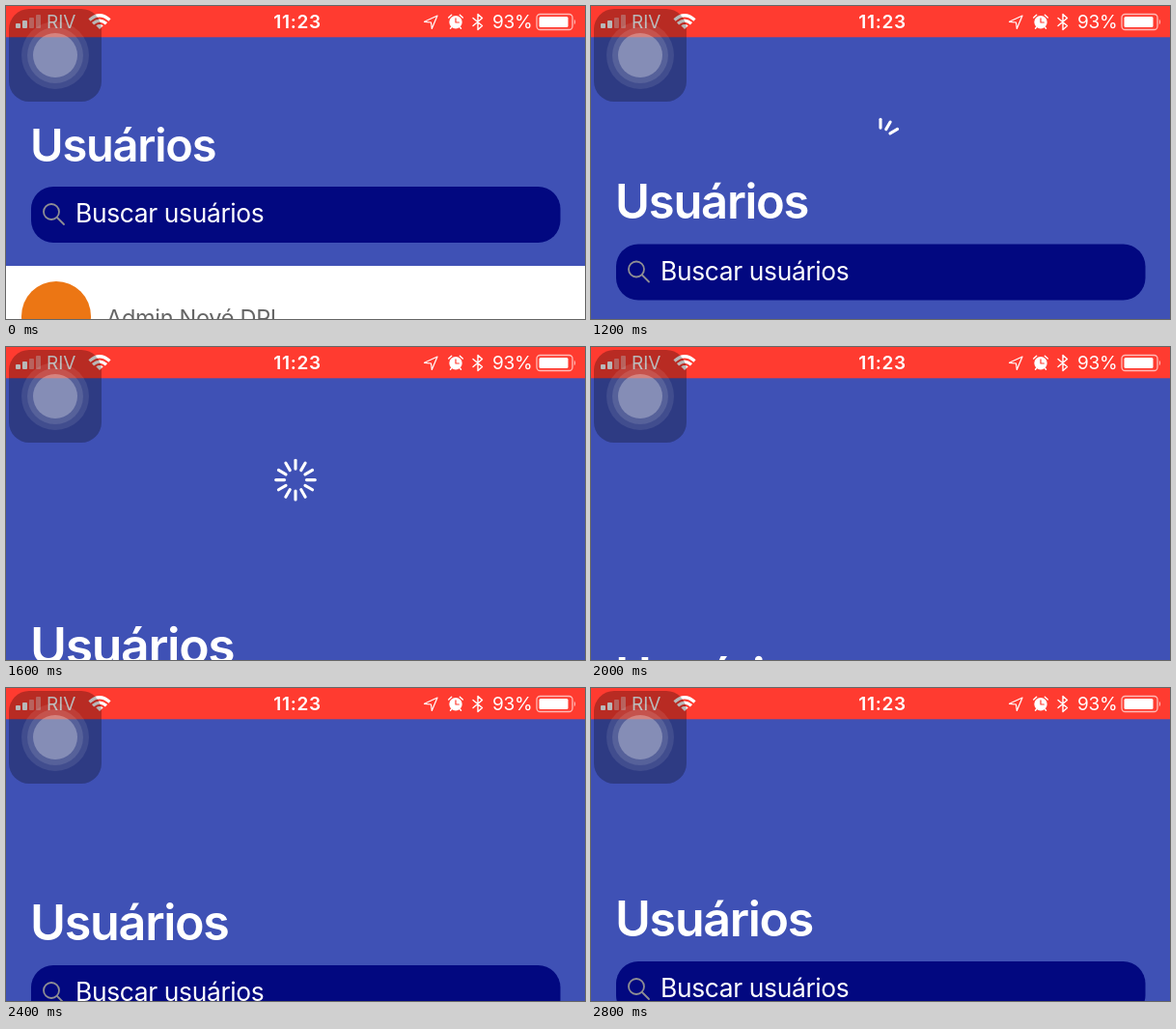
Animation, 600 px wide and 324 px high, one loop 8000 ms. Source, as an HTML page:

```html
<!DOCTYPE html>
<html lang="pt">
<head>
<meta charset="utf-8">
<style>
  html, body { margin: 0; width: 100%; height: 100%; overflow: hidden; }
  svg { display: block; width: 100vw; height: 100vh; }
  text { font-family: Inter, "Liberation Sans", sans-serif; fill: #fff; }
  .status { font-size: 19px; }
  .line { fill: none; stroke: #fff; stroke-linecap: round; stroke-linejoin: round; }
</style>
</head>
<body>
<svg viewBox="0 0 600 324">
  <rect width="600" height="324" fill="#3f51b5"/>

  <g id="page">
    <rect y="269" width="600" height="200" fill="#fff"/>
    <rect x="26" y="187" width="548.5" height="58" rx="23" fill="#020880"/>
    <g fill="none" stroke="#8e8e93" stroke-width="1.8" stroke-linecap="round">
      <circle cx="47" cy="213" r="8"/>
      <path d="M53 219L60 226"/>
    </g>
    <text x="72" y="224" font-size="26.4" letter-spacing="-.35">Buscar usuários</text>
    <circle cx="52" cy="321" r="36" fill="#ec7614"/>
    <text x="104" y="331" font-size="23.5" letter-spacing="-.3" style="fill:#666">Admin Nové DPL</text>
  </g>

  <text id="title" font-size="47" font-weight="600" letter-spacing="-1.2">Usuários</text>
  <g id="spinner" class="line" stroke-width="3.1"></g>

  <rect width="600" height="32.3" fill="#ff3b30"/>
  <g fill="#fff">
    <rect x="10" y="18" width="5" height="5" rx="1"/>
    <rect x="17" y="15" width="5" height="8" rx="1"/>
    <rect x="24" y="12" width="5" height="11" rx="1" opacity=".4"/>
    <rect x="31" y="9" width="5" height="14" rx="1" opacity=".4"/>
  </g>
  <text class="status" x="42" y="23">RIV</text>
  <g class="line" stroke-width="3.2" style="stroke-linecap:butt">
    <path d="M86.5 14.5Q97 5 107.5 14.5"/>
    <path d="M90 18.3Q97 12 104 18.3"/>
  </g>
  <path d="M97 24L93.3 20.3Q97 17.5 100.7 20.3Z" fill="#fff"/>
  <text class="status" x="302" y="23" font-weight="600" letter-spacing=".7" text-anchor="middle">11:23</text>
  <path class="line" stroke-width="1.2" d="M447 10L433.5 16.3L440.5 17L441.3 23.5Z"/>
  <circle cx="466" cy="16.7" r="6.7" fill="#fff"/>
  <path class="line" stroke-width="1.4" d="M458.7 12L461.7 9.3M473.3 12L470.3 9.3M461.5 22L460.5 23.2M470.5 22L471.5 23.2"/>
  <path class="line" stroke-width="1.2" style="stroke:#ff3b30" d="M466 12.8V17H469.3"/>
  <path class="line" stroke-width="1.4" d="M484 12.5L493.5 20.5L489 24.5V8.5L493.5 12.5L484 20.5"/>
  <text class="status" x="504" y="23" letter-spacing="-.2">93%</text>
  <rect x="550" y="8.5" width="37" height="16" rx="3.5" fill="none" stroke="#fff" stroke-opacity=".65" stroke-width="1.3"/>
  <rect x="552.5" y="11" width="30" height="11" rx="1.5" fill="#fff"/>
  <path d="M588.8 13.5Q591.5 16.5 588.8 19.5Z" fill="#fff" opacity=".65"/>

  <rect x="3" y="3" width="96" height="96" rx="21" fill="#000" opacity=".28"/>
  <g fill="#fff">
    <circle cx="51" cy="51" r="35" opacity=".09"/>
    <circle cx="51" cy="51" r="29" opacity=".11"/>
    <circle cx="51" cy="51" r="23" opacity=".28"/>
  </g>
</svg>
<script>
  const LOOP = 8000, STEP = 200, PULL_START = 1200;
  const SPOKES = 12;
  // Pull distance for each step: drag, overshoot, release, settle.
  const pulls = [59.5, 130, 167, 189, 198, 115, 100, 97.5, 96];
  const byId = id => document.getElementById(id);
  const page = byId("page"), title = byId("title"), spinner = byId("spinner");

  const spokes = Array.from({ length: SPOKES }, (_, i) => {
    const spoke = document.createElementNS("http://www.w3.org/2000/svg", "path");
    spoke.setAttribute("d", "M0 -20.3V-11.5");
    spoke.setAttribute("transform", `rotate(${i * 360 / SPOKES})`);
    return spinner.appendChild(spoke);
  });

  function pullAt(time) {
    if (time < PULL_START) return 0;
    const step = Math.floor((time - PULL_START) / STEP);
    return pulls[Math.min(step, pulls.length - 1)];
  }

  // Spokes appear one by one with the pull, then the wheel shrinks away.
  function drawSpinner(time, pull) {
    const shown = time < 2000 ? Math.max(0, Math.round((pull - 33) / 8.8)) : 0;
    const size = time < 1800 ? 1 : 0.5;
    spinner.setAttribute("transform", `translate(300 137.6) scale(${size})`);
    spinner.setAttribute("opacity", size);
    spokes.forEach((spoke, i) => spoke.setAttribute("visibility", i < shown ? "visible" : "hidden"));
  }

  function draw(time) {
    const pull = pullAt(time);
    const scale = Math.min(1.1, 1 + pull * 0.0007);
    page.setAttribute("transform", `translate(0 ${pull})`);
    title.setAttribute("transform", `translate(25 ${160.5 + pull}) scale(${scale})`);
    drawSpinner(time, pull);
  }

  const start = performance.now();
  function tick() {
    draw((performance.now() - start) % LOOP);
    requestAnimationFrame(tick);
  }
  draw(0);
  requestAnimationFrame(tick);
</script>
</body>
</html>
```
